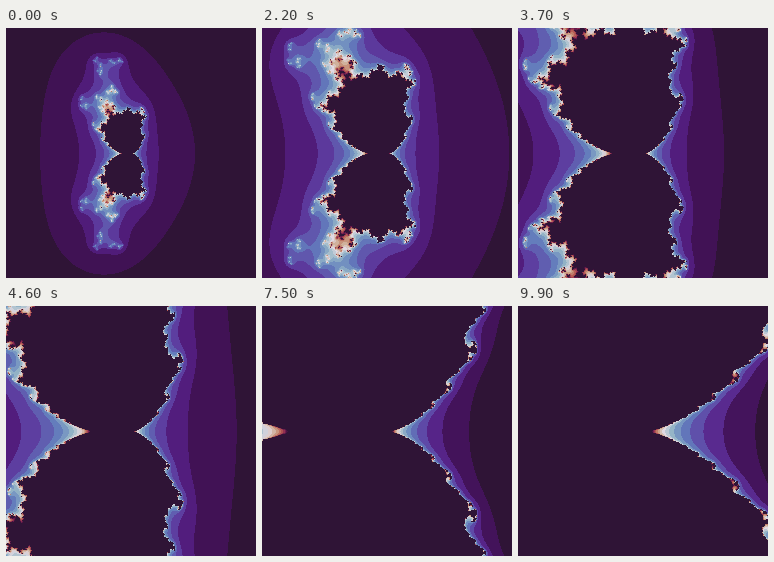
Write an HTML page with a canvas that moves like this. It is 250 px wide and 250 px high and loops after 10000 ms.

```html
<!DOCTYPE html>
<html lang="en">
<head>
<meta charset="utf-8">
<title>Cubic fractal zoom</title>
<style>
  html, body { margin: 0; width: 100%; height: 100%; overflow: hidden; background: #2f1436; }
  canvas { display: block; width: 100vw; height: 100vh; image-rendering: pixelated; }
</style>
</head>
<body>
<canvas id="view" width="250" height="250"></canvas>
<script>
const SIZE = 250;
const CENTER_X = 126, CENTER_Y = 125;
const FRAMES = 100, STEP_MS = 100;
const START_WIDTH = 4, END_WIDTH = 0.2;
const MAX_ITER = 20, ESCAPE = 4;

// Cyclic colour ramp: position, colour
const STOPS = [
  [0, 0x2f1436], [1 / 18, 0x421257], [1 / 9, 0x541e82], [1 / 8, 0x592a8f],
  [1 / 6, 0x5e43a5], [1 / 4, 0x6276ba], [5 / 18, 0x6785be], [3 / 8, 0x95b5c7],
  [7 / 18, 0x9ebbc9], [1 / 2, 0xe2d9e2], [11 / 18, 0xceac94], [5 / 8, 0xcca389],
  [13 / 18, 0xba6657], [3 / 4, 0xb25652], [5 / 6, 0x8e2c50], [7 / 8, 0x741e4f],
  [17 / 18, 0x471340], [1, 0x2f1436]
];

const ctx = document.getElementById('view').getContext('2d');
const image = ctx.createImageData(SIZE, SIZE);
const counts = new Uint8Array(SIZE * SIZE);

function ramp(t) {
  let k = 1;
  while (k < STOPS.length - 1 && STOPS[k][0] < t) k++;
  const [t0, a] = STOPS[k - 1], [t1, b] = STOPS[k];
  const mix = (t - t0) / (t1 - t0);
  return [16, 8, 0].map(shift => {
    const from = a >> shift & 255, to = b >> shift & 255;
    return Math.round(from + (to - from) * mix);
  });
}

// Escape time of z -> z^3 + z^2 + z + c, starting at c
function escapeTime(cx, cy) {
  let x = cx, y = cy;
  for (let n = 0; n < MAX_ITER; n++) {
    // z^2 + z + 1
    const px = x * x - y * y + x + 1;
    const py = 2 * x * y + y;
    const nx = x * px - y * py + cx;
    y = x * py + y * px + cy;
    x = nx;
    if (x * x + y * y > ESCAPE * ESCAPE) return n;
  }
  return MAX_ITER;
}

function draw(frame) {
  const width = START_WIDTH * Math.pow(END_WIDTH / START_WIDTH, frame / FRAMES);
  const unit = width / SIZE;
  let low = MAX_ITER;

  for (let j = 0, p = 0; j < SIZE; j++) {
    for (let i = 0; i < SIZE; i++) {
      const n = escapeTime((i - CENTER_X) * unit, (j - CENTER_Y) * unit);
      counts[p++] = n;
      if (n < low) low = n;
    }
  }

  // Stretch the ramp over the counts in view
  const palette = [];
  for (let n = low; n <= MAX_ITER; n++) palette[n] = ramp((n - low) / (MAX_ITER - low));

  counts.forEach((n, p) => {
    const [r, g, b] = palette[n];
    image.data[4 * p] = r;
    image.data[4 * p + 1] = g;
    image.data[4 * p + 2] = b;
    image.data[4 * p + 3] = 255;
  });
  ctx.putImageData(image, 0, 0);
}

const start = performance.now();
let shown = -1;

function tick() {
  const frame = Math.floor((performance.now() - start) / STEP_MS) % FRAMES;
  if (frame !== shown) {
    shown = frame;
    draw(frame);
  }
  requestAnimationFrame(tick);
}
tick();
</script>
</body>
</html>
```
